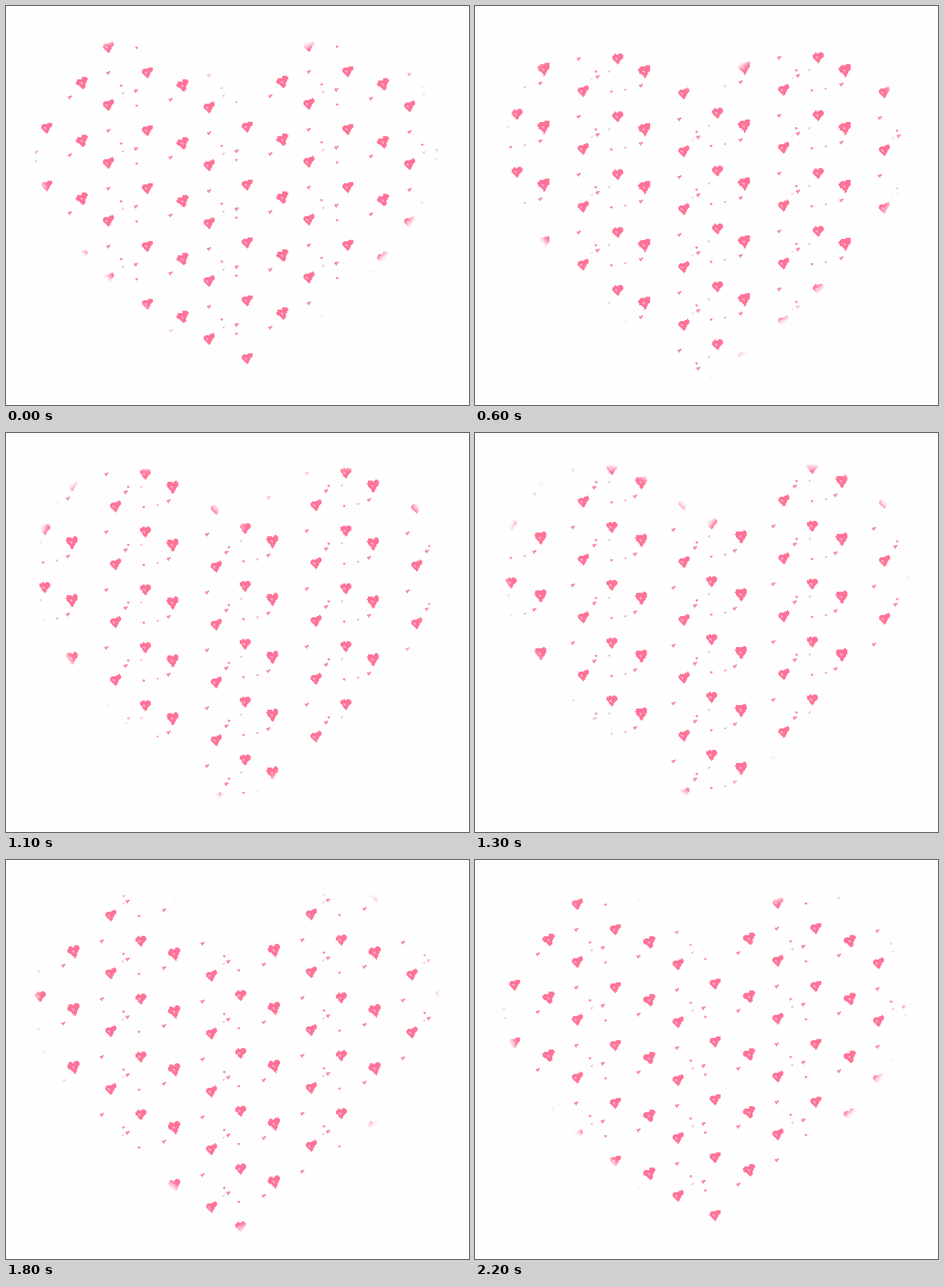
These frames come from a looping animation (806 px wide and 695 px high, 2.3 s). An HTML page with a canvas:

```html
<!DOCTYPE html>
<html lang="en">
<head>
<meta charset="utf-8">
<title>Drifting hearts</title>
<style>
  html, body { margin: 0; width: 100%; height: 100%; overflow: hidden; background: #fefefe; }
  canvas { display: block; }
</style>
</head>
<body>
<canvas id="stage" width="806" height="695"></canvas>
<script>
const W = 806, H = 695, LOOP = 2300, STEP = 100, FRAMES = LOOP / STEP;
const ROW = 100.8;                             // height of one pattern tile
const PAIR = [349, -2], HALF = [175.3, 4.2];   // sideways repeats
const CELL = 2.1;
const PINK = '#ff7297', LIGHT = '#ffb4c7', DUST = '#f4809f';

const canvas = document.getElementById('stage');
const ctx = canvas.getContext('2d');

// Distance scrolled upwards: slow for 15 steps, then a little faster.
const SLOW = 4.065, TURN = 15;
const FAST = (ROW - SLOW * TURN) / (FRAMES - TURN);
const scroll = f => SLOW * Math.min(f, TURN) + FAST * Math.max(f - TURN, 0);

// Everything else follows the phase u, from 0 to 1 over one tile.
const wave = (u, peak, turns = 1) => Math.cos(2 * Math.PI * turns * (u - peak));

const swayA = u => 184.8 + 6.3 * wave(u, .42) + 1.1 * wave(u, .3, 2);
const swayB = u => 114.5 + 18.5 * ((u - .54) / (u < .54 ? .54 : .46)) ** 2;
const swayC = u => 67 + 7.6 * wave(u, .18) + 1.2 * wave(u, .42, 2);
const still = () => 0;

const hearts = [
  { sway: swayA, y: 72.6, w: 9.6, h: 9.8, glint: -3.6,
    tilt: still, shear: () => .26 },
  { sway: swayB, y: 135, w: 10.6, h: 11.4, glint: -1.8,
    tilt: u => -.14 * (1 + wave(u, .92)), shear: u => .12 + .1 * wave(u, .1) },
  { sway: swayC, y: 112.4, w: 9.5, h: 9.6, glint: -2.6,
    tilt: still, shear: u => .15 + .08 * wave(u, 0) }
];

// A speck with a peak glows around that phase and goes out opposite it.
const specks = [
  { sway: swayC, dx: 107.3, y: 116.8, w: 3.3, h: 2.9 },
  { sway: swayC, dx: 40.3, y: 159.3, w: 3.3, h: 2.9 },
  { sway: swayA, dx: -126.3, y: 169.8, w: 2.8, h: 2.4 },
  { sway: swayA, dx: 22, y: 139, w: 2.8, h: 2.4 },
  { sway: swayB, dx: 93.3, y: 148.3, w: 3.3, h: 3.3 },
  { sway: swayA, dx: -102.3, y: 166, w: 2.3, h: 1.7, peak: .38 },
  { sway: swayA, dx: -130.3, y: 134, w: 2.2, h: 1.6, peak: .38 },
  { sway: still, dx: 203.5, y: 152, w: 2, h: 1.6, peak: .98 }
];

const glow = (u, peak) =>
  peak === undefined ? .92 : Math.min(.75, Math.max(0, .5 + .6 * wave(u, peak)));

function inHeart(x, y) {
  const ax = Math.abs(x);
  return (ax - .45) ** 2 + (y + .4) ** 2 < .3 ||
         (y > -.4 && ax + (y + .35) * .72 < 1);
}

// Blocky heart centred on the origin; shear lifts its right lobe.
function heartPath(w, h, tilt, shear, cell) {
  const path = new Path2D(), c = Math.cos(tilt), s = Math.sin(tilt);
  const n = Math.ceil(Math.max(w, h) * 1.3 / cell);
  for (let j = -n; j <= n; j++) {
    for (let i = -n; i <= n; i++) {
      const px = i * cell, py = j * cell;
      const x = px * c + py * s, y = py * c - px * s + shear * px;
      if (inHeart(x / w, y / h)) path.rect(px - cell / 2, py - cell / 2, cell, cell);
    }
  }
  return path;
}

// Call draw at every place where the pattern repeats.
function tile(x, y, draw) {
  for (let i = -1; i <= 2; i++) {
    for (let half = 0; half < 2; half++) {
      for (let k = -2; k <= 7; k++) {
        ctx.save();
        ctx.translate(x + i * PAIR[0] + half * HALF[0],
                      y + i * PAIR[1] + half * HALF[1] + k * ROW);
        draw();
        ctx.restore();
      }
    }
  }
}

// Soft heart-shaped window: one curved half and its mirror image
function makeMask() {
  const mask = document.createElement('canvas');
  mask.width = W;
  mask.height = H;
  const m = mask.getContext('2d');
  const half = new Path2D('M0 170 C-35 135 -90 58 -188 60 S-348 150 -348 250 C-348 380 -180 520 0 648 Z');
  const whole = new Path2D(half);
  whole.addPath(half, new DOMMatrix().scale(-1, 1));
  m.filter = 'blur(5px)';
  m.translate(400, 0);
  m.fill(whole);
  return mask;
}
const mask = makeMask();

function render(f) {
  const up = scroll(f), u = up / ROW;
  ctx.clearRect(0, 0, W, H);

  for (const p of hearts) {
    const path = heartPath(p.w, p.h, p.tilt(u), p.shear(u), CELL);
    tile(p.sway(u), p.y - up, () => {
      ctx.fillStyle = PINK;
      ctx.fill(path);
      ctx.fillStyle = LIGHT;
      ctx.fillRect(p.glint - CELL, -CELL, 2 * CELL, CELL);
      ctx.fillRect(p.glint, 0, CELL, CELL);
    });
  }

  ctx.fillStyle = DUST;
  for (const p of specks) {
    const path = heartPath(p.w, p.h, 0, .2, 1.4);
    tile(p.sway(u) + p.dx, p.y - up, () => {
      ctx.globalAlpha = glow(u, p.peak);
      ctx.fill(path);
    });
  }

  ctx.globalCompositeOperation = 'destination-in';
  ctx.drawImage(mask, 0, 0);
  ctx.globalCompositeOperation = 'source-over';
}

const start = performance.now();
let shown = -1;

function tick() {
  const f = Math.floor((performance.now() - start) / STEP) % FRAMES;
  if (f !== shown) render(shown = f);
  requestAnimationFrame(tick);
}
tick();
</script>
</body>
</html>
```
